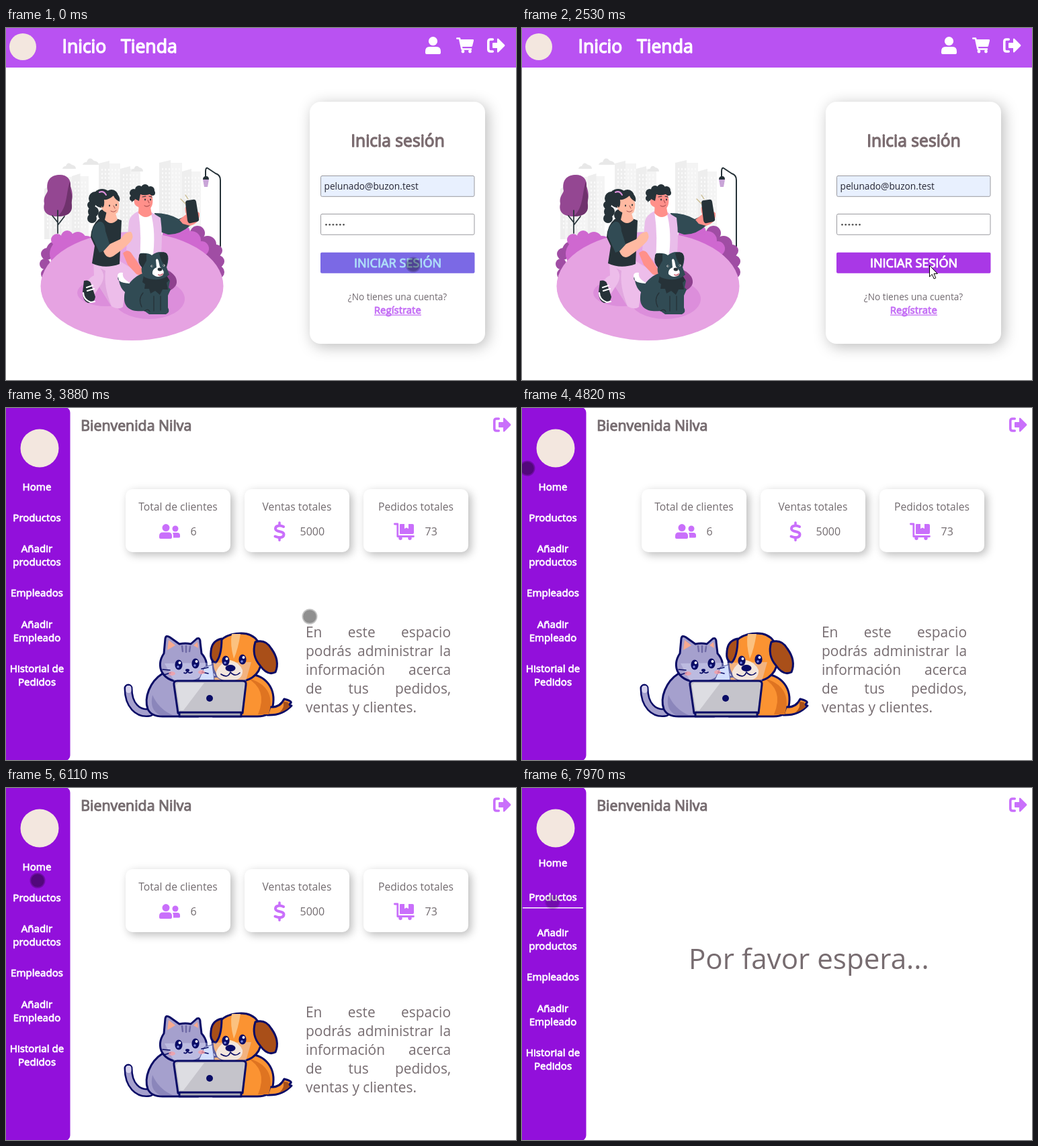
Recreate the animation shown at these times as an HTML page with a canvas. Size 759 by 525 pixels, loop 8 s.

```html
<!DOCTYPE html>
<html lang="es">
<head>
<meta charset="utf-8">
<title>Panel</title>
<style>
html, body { margin: 0; width: 100%; height: 100%; overflow: hidden; background: #fff; }
canvas { display: block; }
</style>
</head>
<body>
<canvas id="stage" width="759" height="525"></canvas>
<script>
const g = document.getElementById('stage').getContext('2d');
const LOOP = 8000, STEP = 67;
const GRAY = '#766c70', LILAC = '#c96ffb', INK = '#263238', TEAL = '#314b54', NAVY = '#0a0c66';

// Drawing helpers
const fill = (c, d) => { g.fillStyle = c; g.fill(new Path2D(d)); };
const line = (c, w, d) => {
  g.strokeStyle = c; g.lineWidth = w; g.lineCap = g.lineJoin = 'round';
  g.stroke(new Path2D(d));
};
const shape = (c, w, d) => { fill(c, d); line(NAVY, w, d); };
const oval = (c, x, y, rx, ry = rx, rot = 0) => {
  g.fillStyle = c; g.beginPath(); g.ellipse(x, y, rx, ry, rot, 0, 7); g.fill();
};
const box = (c, x, y, w, h, r = 0) => {
  g.fillStyle = c; g.beginPath(); g.roundRect(x, y, w, h, r); g.fill();
};
const blobs = (c, list) => list.forEach(([x, y, r]) => oval(c, x, y, r));
const at = (x, y, draw) => { g.save(); g.translate(x, y); draw(); g.restore(); };

function text(s, x, y, size, color, bold = false, align = 'left') {
  g.font = `${size}px "Open Sans", sans-serif`;
  g.textAlign = align;
  g.fillStyle = color;
  g.fillText(s, x, y);
  if (bold) {
    g.strokeStyle = color; g.lineWidth = size / 19; g.lineJoin = 'round';
    g.strokeText(s, x, y);
  }
}

function justify(rows, x, y, width, lead) {
  const size = 20.9;
  rows.forEach((row, i) => {
    const words = row.split(' '), by = y + i * lead;
    if (i === rows.length - 1) return text(row, x, by, size, GRAY);
    g.font = `${size}px "Open Sans", sans-serif`;
    const sum = words.reduce((a, w) => a + g.measureText(w).width, 0);
    const gap = (width - sum) / (words.length - 1);
    let px = x;
    for (const w of words) { text(w, px, by, size, GRAY); px += g.measureText(w).width + gap; }
  });
}

function card(x, y, w, h, r, blur, off) {
  g.save();
  g.shadowColor = 'rgba(0,0,0,.27)'; g.shadowBlur = blur;
  g.shadowOffsetX = g.shadowOffsetY = off;
  box('#fff', x, y, w, h, r);
  g.restore();
}

// Icons
const exitIcon = (x, y, c) => at(x, y, () => {
  line(c, 3.6, 'M8.3 -9H5Q1.8 -9 1.8 -5.8V5.8Q1.8 9 5 9H8.3');
  fill(c, 'M9 -4H15V-9Q15 -11.5 17 -10L26 -1Q27 0 26 1L17 10Q15 11.5 15 9V4H9Q8 4 8 3V-3Q8 -4 9 -4Z');
});
const userIcon = (x, y) => at(x, y, () => {
  oval('#fff', 11.5, 6.7, 6.6);
  fill('#fff', 'M6 15H17Q23 15 23 22V24Q23 26 21 26H2Q0 26 0 24V22Q0 15 6 15Z');
});
const cartIcon = (x, y) => at(x, y, () => {
  line('#fff', 2.6, 'M1.3 1.5H5L8.5 17.5H22');
  fill('#fff', 'M5 3H25Q26.5 3 26 5L24 13Q23.6 14 22.5 14H8Z');
  oval('#fff', 10, 21, 2.4); oval('#fff', 20.5, 21, 2.4);
});
const usersIcon = (x) => at(x, 173, () => {
  oval(LILAC, 10, 5.6, 5.5); oval(LILAC, 24, 7, 4.5);
  fill(LILAC, 'M5 12.5H14Q19 12.5 19 18V20Q19 22 17 22H2Q0 22 0 20V18Q0 12.5 5 12.5Z');
  fill(LILAC, 'M20 13H27Q31 13 31 17V19Q31 20.5 29 20.5H21V17Q21 15 20 13Z');
});
const moneyIcon = (x) => at(x, 169, () => {
  line(LILAC, 4, 'M15 8C10 5.5 3 6 3 11C3 17 15.5 13.5 15.5 19.5C15.5 25 8 25 2.5 22.5');
  line(LILAC, 3.6, 'M9 2V6M9 24V28.3');
});
const dollyIcon = (x) => at(x, 171, () => {
  line(LILAC, 2.8, 'M1.4 2H5.8V20.5H29.5');
  fill(LILAC, 'M10 2H16V9L19 7.5L22 9V2H28Q30 2 30 4V15Q30 17 28 17H10Q9 17 9 16V3Q9 2 10 2Z');
  oval(LILAC, 10, 23.2, 2.7); oval(LILAC, 24, 23.2, 2.7);
});

// Park illustration
function city() {
  const towers = [[57, 240, 14], [68, 222, 30], [98, 221, 25], [138, 202, 32],
    [170, 210, 30], [228, 201, 34], [262, 214, 28]];
  for (const [x, y, w] of towers) {
    box('#f4f4f4', x, y, w, 315 - y);
    fill('#eeeeee', `M${x} ${y}L${x + w / 2} ${y - 4}V315H${x}Z`);
    for (let wx = x + 4; wx < x + w - 2; wx += 5)
      for (let wy = y + 8; wy < 300; wy += 6) box('#fafafa', wx, wy, 2, 3);
  }
  for (const [x, y, k] of [[94, 207, 1], [126, 201, 1.2], [195, 211, .9]])
    fill('#e8e8e8', `M${x - 10 * k} ${y + 3}Q${x - 9 * k} ${y - 1} ${x - 5 * k} ${y - 1}Q${x - 2 * k} ${y - 9 * k} ${x + 4 * k} ${y - 3}Q${x + 10 * k} ${y - 2} ${x + 10 * k} ${y + 3}Z`);
}

function park() {
  city();
  fill('#944792', 'M78 219C91 218 97 226 96 236C100 247 99 252 97 260C101 275 91 281 77 281C61 281 54 274 57 262C55 252 60 249 62 243C59 228 66 220 78 219Z');
  fill('#6f326d', 'M95 229C97 237 95 241 97 246C100 253 97 258 98 264C99 277 90 281 77 281C92 267 89 247 95 229Z');
  line(INK, 1.7, 'M77 272V306M77 290L69 280M77 294L87 281');
  line(INK, 2, 'M319 334V227Q319 219 312 217L300 209Q297 208 297 214V222');
  fill(INK, 'M293 226Q293 221 298 221Q302 221 302 226Z');
  fill('#c9a5d8', 'M293 226H302L300 237H295Z');
  blobs('#a04da4', [[61, 337, 9], [58, 352, 8], [61, 367, 9], [74, 332, 14], [285, 306, 11],
    [300, 323, 13], [313, 332, 9], [316, 348, 9], [315, 364, 10], [304, 350, 18]]);
  blobs('#cf68d0', [[76, 316, 9], [91, 311, 9], [107, 316, 12], [88, 337, 23], [119, 325, 15],
    [246, 308, 13], [262, 305, 12], [276, 317, 14], [291, 329, 11], [265, 332, 26]]);
  oval('#e6a3e2', 187.5, 385, 136, 81);
  oval('#dc8edb', 213, 404, 53, 30); oval('#dc8edb', 149, 395, 43, 20);
  man(); woman(); dog();
}

function man() {
  fill('#8f418f', 'M207 362Q238 352 252 371Q259 384 243 392H208Z');
  fill(TEAL, 'M221 276Q242 276 257 285L268 280L275 294Q258 309 241 308L218 300Z');
  fill('#ff908a', 'M258 286L268 278Q264 266 271 264L288 276Q289 291 274 295L263 292Z');
  fill(INK, 'M271 257Q267 257 267 261L270 287Q271 292 275 291L284 289Q288 288 287 284L283 259Q282 255 278 256Z');
  line('#c8b98b', 1.3, 'M267 262L260 255M271 255L267 249');
  fill('#fff', 'M192 276Q205 267 222 278L224 343H193Z');
  fill('#e9bdea', 'M197 273Q185 279 183 288L179 331L198 349Q203 315 197 273Z');
  fill('#e9bdea', 'M215 274L230 283Q234 312 230 344L218 345Q224 305 215 274Z');
  fill('#ff908a', 'M198 261L214 262L217 278Q207 287 197 276Z');
  fill('#ff908a', 'M193 251Q192 246 198 242L216 245Q222 263 213 271Q203 275 197 267Q187 263 193 251Z');
  blobs(INK, [[190, 246, 6], [198, 241, 6], [207, 239, 6], [215, 242, 6], [218, 246, 4], [188, 254, 4]]);
  fill(INK, 'M187 260L186 246L210 239L216 247Q207 251 200 248L198 258L192 255Z');
  oval(INK, 207, 256, 1, 1.4); oval(INK, 215, 256, 1, 1.4);
  line('#9c4345', 1, 'M206 265Q210 268 214 264M211 257L213 261');
  line(INK, 1.2, 'M203 252L208 251M213 251L217 252');
}

function woman() {
  blobs(INK, [[143, 254, 14], [133, 254, 10], [127, 264, 6], [130, 274, 8], [128, 284, 7], [157, 251, 10], [146, 279, 9]]);
  fill('#edbdea', 'M130 347L170 348L201 367Q203 383 179 380L174 416Q168 421 157 415L139 386L130 400L116 394Q119 374 131 369Z');
  fill('#e1a7df', 'M140 358Q151 370 139 386L157 415Q145 385 148 362Z');
  fill(INK, 'M116 377Q123 375 126 380L133 401Q132 410 122 410Q114 407 114 394Z');
  line('#fff', 2.2, 'M115 395Q115 405 126 409L132 408M120 387L129 384M121 392L131 389');
  fill(INK, 'M138 285Q153 279 172 287L169 352Q147 360 128 351L132 325L126 312Q127 294 138 285Z');
  fill(TEAL, 'M138 289Q127 295 128 311L139 335L156 328L148 303Q147 287 138 289Z');
  fill('#ffb9a1', 'M145 333L155 322L170 315Q178 303 186 304Q191 310 186 318Q176 329 160 340Q150 346 145 333Z');
  fill('#ffb9a1', 'M150 273H162L166 286Q156 296 147 286Z');
  fill('#ffb9a1', 'M144 259Q149 247 163 251Q172 261 166 275Q157 283 149 275Q138 270 144 259Z');
  fill(INK, 'M140 263Q141 244 158 245Q171 247 169 259Q162 256 160 250Q152 257 146 256Q147 265 144 268Z');
  line('#dc8edb', 2, 'M139 245Q145 242 149 249');
  oval(INK, 154, 265, 1, 1.4); oval(INK, 164, 264, 1, 1.4);
  line('#a74f4c', 1, 'M156 273Q161 276 164 272M160 265L162 269');
  fill('#ff908a', 'M174 336Q181 329 186 335L202 359L203 371L194 367L181 353Z');
}

function dog() {
  fill('#fff', 'M181 385Q165 377 166 369Q167 364 174 365Q172 374 185 380Z');
  fill(TEAL, 'M183 381Q163 379 167 371Q170 396 187 398Z');
  fill(TEAL, 'M207 365C190 369 177 385 176 401C175 418 187 424 206 422L213 427H238Q245 424 241 417L241 399L245 390L242 387L244 377L236 365Z');
  fill(INK, 'M205 369L203 379L207 382L206 389L213 389L215 396L222 392L229 398L233 390L241 390L239 380L243 376L237 366Z');
  line(INK, 1.3, 'M204 395Q196 404 202 416M220 400V422M230 400V421M206 422Q212 418 214 423');
  fill(TEAL, 'M203 352Q196 338 200 336Q212 335 217 339Q227 331 239 336Q244 342 239 357L243 368Q229 380 207 372Q199 366 203 352Z');
  fill(INK, 'M198 340Q197 335 209 337L209 347L203 358Q195 350 198 340ZM228 336Q241 330 241 345L238 356Q231 350 228 336Z');
  fill('#fff', 'M223 346Q225 342 227 347L229 356Q238 363 233 369Q225 374 218 367Q217 360 224 357Z');
  oval(INK, 229, 360, 3.4, 2.4); oval('#fff', 217, 355, 1.6); oval('#fff', 235, 354, 1.6);
  oval(INK, 217.4, 355, 1); oval(INK, 234.6, 354, 1);
  line('#d0717f', 2, 'M227 368Q230 370 233 367');
}

// Cat and dog with a laptop
function pets() {
  line(NAVY, 13, 'M214 454C196 457 182 443 182 418');
  line('#a5a0cd', 8, 'M214 454C196 457 182 443 182 418');
  line('#d6d2ec', 8, 'M182.5 421V418');
  shape('#a5a0cd', 3, 'M233 396C214 408 205 432 211 449Q216 460 233 460H286V397Z');
  fill('#8b86bb', 'M218 428Q213 450 229 458H248Q227 449 218 428Z');
  shape('#a5a0cd', 3, 'M235 366L237 344Q238 338 244 342L258 352Q267 350 275 352L284 344Q289 342 289 349L291 366C307 384 298 408 266 409C231 409 222 385 235 366Z');
  fill('#f7a98e', 'M240 361L242 346L252 354ZM286 358L285 349L279 354Z');
  line('#6f6aa6', 2.5, 'M262 355L263 363M268 355V364M274 356L273 363');
  shape('#fb9332', 3, 'M356 396C388 397 402 419 397 445Q394 460 374 460H308V401Z');
  shape('#fb9332', 3, 'M393 446Q408 447 414 434Q426 437 424 440Q419 443 425 444Q411 459 389 458Z');
  fill('#a94f19', 'M412 438Q422 438 420 441L422 446Q415 452 407 454Q416 446 412 438Z');
  fill('#df7421', 'M357 402Q391 419 375 457H391Q404 414 357 402Z');
  shape('#fb9332', 3, 'M309 364C315 345 330 336 350 336C373 336 383 354 380 378C378 400 360 410 337 408C312 407 303 392 309 364Z');
  shape('#a94f19', 3, 'M371 349Q386 344 395 359Q408 377 401 394Q389 400 378 384Q365 369 371 349Z');
  shape('#a94f19', 3, 'M321 344Q306 347 305 363Q303 377 312 380Q321 370 321 344Z');
  fill('#fde4c8', 'M334 376Q347 379 352 391Q353 407 331 407Q311 405 313 393Q319 379 334 376Z');
  fill('#fbc17f', 'M336 337H349Q345 361 339 374Q333 352 336 337Z');
  shape('#c7d7ff', 1, 'M296 386L307 383L310 406H287Z');
  // Screen glow
  fill('rgba(225,232,255,.38)', 'M250 407L236 381L365 379L357 407Z');
  for (const [x, y] of [[257, 383], [282, 381], [327, 377], [352, 375]]) {
    oval(NAVY, x, y, 5.6, 7.4); oval('#fff', x + 1.5, y - 3, 2); oval('#7f89df', x - 1, y + 3, 1.8);
  }
  oval(NAVY, 334, 388, 7.5, 5); oval(NAVY, 270, 391, 3, 2);
  line(NAVY, 1.7, 'M265 395Q269 397 270 392Q272 397 277 394M320 397Q330 404 334 394Q341 402 348 395');
  line(NAVY, 1.5, 'M233 390L244 391M235 398L245 395M291 389L301 387M292 394L301 396');
  oval('rgba(250,155,160,.75)', 247, 396, 5, 3); oval('rgba(250,155,160,.75)', 291, 394, 5, 3);
  shape('#c5c4cb', 3, 'M255 407H352Q358 407 357 413L352 455H256L250 413Q249 407 255 407Z');
  fill('#dddde2', 'M256 410H295L264 451H259L253 413Z');
  shape('#aaaab5', 3, 'M258 454H350V460H258Z');
  oval(NAVY, 303, 433, 5);
}

// Screens
function login(active) {
  box('#b952f2', 0, 0, 759, 59);
  oval('#f3e7df', 25, 28, 20);
  text('Inicio', 83.5, 37, 26.6, '#fff', true);
  text('Tienda', 171, 37, 26.6, '#fff', true);
  userIcon(624, 13); cartIcon(670, 14); exitIcon(716, 26, '#fff');
  park();
  card(452, 110, 261, 361, 16, 22, 4);
  text('Inicia sesión', 583, 177, 24.6, '#7a6b6f', true, 'center');
  for (const [y, c] of [[220.5, '#e8f0fe'], [277.5, '#fff']]) {
    box(c, 468.5, y, 228.5, 30.8, 2);
    g.strokeStyle = '#9a9a9f'; g.lineWidth = 1; g.stroke();
  }
  text('pelunado@buzon.test', 473.5, 241, 13.7, '#252533');
  for (let i = 0; i < 6; i++) oval('#555', 476.5 + i * 5.2, 293.3, 1.4);
  box(active ? '#7b69e5' : '#a938e6', 468, 334.7, 229.5, 31, 2);
  text('INICIAR SESIÓN', 583, 357, 18.1, active ? '#aeddf8' : '#fff', true, 'center');
  text('¿No tienes una cuenta?', 582.5, 406, 13.7, '#716a70', false, 'center');
  text('Regístrate', 582.8, 426, 15, '#c36cf5', true, 'center');
  box('#c36cf5', 548, 427.5, 70, 1.3);
}

function frame(hover) {
  box('#9210db', 0, -1, 95.5, 527, [0, 8, 8, 0]);
  oval('#f3e7df', 50, 60, 28.5);
  const up = hover ? 6 : 0;
  const items = [['Home', 123 - up], ['Productos', 169 - up / 6], ['Añadir', 215 + up],
    ['productos', 235 + up], ['Empleados', 281 + up], ['Añadir', 328 + up],
    ['Empleado', 348 + up], ['Historial de', 394 + up], ['Pedidos', 414 + up]];
  for (const [s, y] of items) text(s, 46, y, 15.1, '#fff', true, 'center');
  if (hover) box('#fff', 1, 178, 90, 1.5);
  text('Bienvenida Nilva', 111.3, 34, 21.3, GRAY, true);
  exitIcon(725, 25, LILAC);
}

function panel(loaded, counted) {
  ['Total de clientes', 'Ventas totales', 'Pedidos totales'].forEach((s, i) => {
    const x = 178 + i * 177;
    card(x, 121, 156, 94, 10, 13, 4);
    text(s, x + 78, 153, 15.7, '#726b6f', false, 'center');
  });
  usersIcon(counted ? 228 : 233);
  moneyIcon(counted ? 398 : 416);
  dollyIcon(counted ? 577 : 587);
  if (counted) [['6', 274.5], ['5000', 437.5], ['73', 623.5]]
    .forEach(([s, x]) => text(s, x, 190, 16, '#726b6f'));
  if (loaded) {
    pets();
    justify(['En este espacio', 'podrás administrar la', 'información acerca', 'de tus pedidos,',
      'ventas y clientes.'], 446, 342, 216, 28);
  } else {
    justify(['En este espacio podrás', 'administrar la información',
      'acerca de tus pedidos, ventas y', 'clientes.'], 343, 289, 319, 27.7);
  }
}

function statusBar() {
  box('rgba(100,100,100,.74)', 0, 508, 249, 18, [0, 3, 0, 0]);
  text('Esperando a carpanube.voltimaxo.test...', 1, 522.5, 11.1, '#d6bfe6');
}

// Pointer
function dot(x, y, a = 1) {
  g.globalAlpha = a;
  oval('rgba(0,0,0,.24)', x, y, 11.5);
  oval('rgba(0,0,0,.26)', x, y, 9.8);
  g.globalAlpha = 1;
}
const arrow = (x, y) => at(x, y, () => {
  const d = 'M.5 .5V17L4.3 13.4L7.2 20L9.8 18.8L7 12.4H12Z';
  fill('#fff', d); line('#000', 1, d);
});

// Each stroke: time, x, y; the last point holds until the next stroke
const strokes = [
  [[3470, 742, 501], [3872, 452, 311], [4140, 240, 130]],
  [[4350, 748, 11], [4819, 8, 90], [5020, 143, 86]],
  [[5160, 143, 86], [5560, 48, 153], [5830, 47, 138]],
  [[6110, 47, 138], [6310, 37, 128], [6580, 44, 177], [6780, 45.5, 170]]
];

function pointer(t) {
  if (t < 3470 || (t >= 4160 && t < 4350)) return;
  const keys = strokes.filter(s => s[0][0] <= t).pop();
  const q = keys[0][0] + Math.floor((t - keys[0][0]) / STEP) * STEP;
  const i = keys.findIndex(k => k[0] > q);
  if (i < 0) return dot(...keys[keys.length - 1].slice(1));
  const [a, b] = [keys[i - 1], keys[i]], k = (q - a[0]) / (b[0] - a[0]);
  dot(a[1] + (b[1] - a[1]) * k, a[2] + (b[2] - a[2]) * k);
}

function draw(t) {
  box('#fff', 0, 0, 759, 525);
  if (t < 2730) {
    const pressed = t >= 2600;
    login(t < 130 || pressed);
    if (t < 200 || pressed) dot(606, 353, t < 130 || pressed ? .8 : .3);
    else if (t >= 2530) arrow(606, 354);
  } else if (t < 7970) {
    frame(t >= 7840);
    panel(t >= 3010, t >= 3070);
    if (t < 3140) statusBar();
    if (t < 2930) dot(610, 369, .25);
    pointer(t);
  } else {
    frame(true);
    text('Por favor espera...', 248, 270, 42.1, '#776c70');
    dot(45.5, 170, .45);
  }
}

const start = performance.now();
function tick() {
  draw((performance.now() - start) % LOOP);
  requestAnimationFrame(tick);
}
tick();
</script>
</body>
</html>
```
